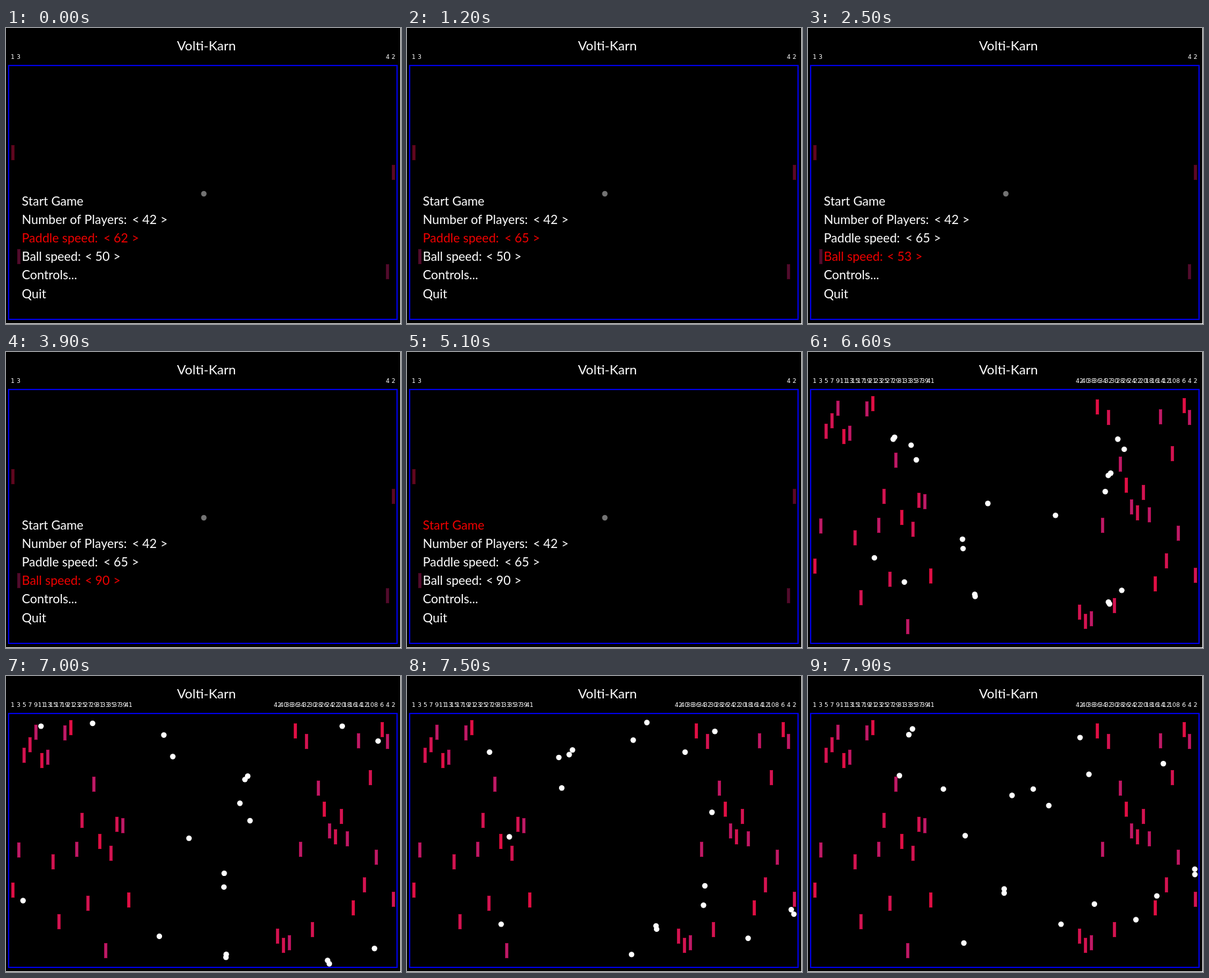
An HTML page with a canvas that plays this animation: 600x450 px, repeating every 8000 ms.

```html
<!DOCTYPE html>
<html lang="en">
<head>
<meta charset="utf-8">
<title>Volti-Karn</title>
<style>
  html, body { margin: 0; width: 100%; height: 100%; overflow: hidden; background: #000; }
  canvas { display: block; }
</style>
</head>
<body>
<canvas width="600" height="450"></canvas>
<script>
const ctx = document.querySelector('canvas').getContext('2d');
const LOOP = 8000, GAME_START = 5800, FRAME = 100;
const LAUNCH = 5750, STEP = 10, SPEED = 0.245, RADIUS = 4.2;
const FIELD = { left: 9, right: 589, top: 62, bottom: 438 };

// Paddles stand in columns from each side inwards; only their heights are free.
const makeSide = (heights, isLeft) => heights.map((y, i) => ({
  x: isLeft ? 10.2 + 8.8 * i : 588.6 - 8.8 * i,
  y,
  label: 2 * i + (isLeft ? 1 : 2),
  tint: Math.abs(Math.sin((i + (isLeft ? 0 : 3)) * Math.PI * 0.4)) ** 2
}));
const makePaddles = (left, right) => [...makeSide(left, true), ...makeSide(right, false)];

const menuPaddles = makePaddles([190, 348], [220, 371]);
const gamePaddles = makePaddles(
  [326, 265, 121, 105, 86, 129, 124, 283, 374, 87, 79, 264, 220, 346, 165, 252, 418, 270, 226, 228, 341],
  [340, 100, 82, 276, 155, 318, 99, 353, 248, 214, 245, 236, 203, 171, 386, 100, 264, 84, 406, 410, 396]
);

// Launch directions in degrees, clockwise from the right.
const launchAngles = [
  -35, -30, -19, -18, -11, -1, 32, 38, 39,
  145, 146, 152, 163, 167, 171, 186, 205, 212, 215, 216
];

function moveBall(ball) {
  ball.x += ball.vx * STEP;
  ball.y += ball.vy * STEP;
  if (ball.y < FIELD.top) ball.vy = Math.abs(ball.vy);
  if (ball.y > FIELD.bottom) ball.vy = -Math.abs(ball.vy);
  if (ball.x < FIELD.left) ball.vx = Math.abs(ball.vx);
  if (ball.x > FIELD.right) ball.vx = -Math.abs(ball.vx);
  const hit = gamePaddles.find(p =>
    Math.abs(ball.x - p.x) < 2.5 + RADIUS && Math.abs(ball.y - p.y) < 11 + RADIUS);
  if (hit) ball.vx = Math.sign(ball.x - hit.x) * Math.abs(ball.vx);
}

// Plays the round once and keeps the ball positions of every displayed moment.
function playRound() {
  const balls = launchAngles.map(degrees => {
    const angle = degrees * Math.PI / 180;
    return { x: 300, y: 252, vx: SPEED * Math.cos(angle), vy: SPEED * Math.sin(angle) };
  });
  const moments = {};
  for (let t = LAUNCH; t < LOOP; t += STEP) {
    if (t % FRAME === 0) moments[t] = balls.map(({ x, y }) => [x, y]);
    balls.forEach(moveBall);
  }
  return moments;
}
const round = playRound();

function text(str, x, y, size, color = '#fff', align = 'left', family = 'Lato') {
  ctx.font = `${size}px ${family}, sans-serif`;
  ctx.textAlign = align;
  ctx.fillStyle = color;
  ctx.fillText(str, x, y);
}

function dot(x, y, color) {
  ctx.fillStyle = color;
  ctx.beginPath();
  ctx.arc(x, y, RADIUS, 0, Math.PI * 2);
  ctx.fill();
}

function drawPaddle({ x, y, label, tint }, light) {
  const shade = (...rgb) => `rgb(${rgb.map(c => Math.round(c * light)).join(',')})`;
  const left = Math.round(x - 2.5), top = y - 12;
  ctx.fillStyle = shade(200 - 30 * tint, 8, 50 + 30 * tint);
  ctx.fillRect(left, top, 5, 23);
  ctx.fillStyle = shade(222 - 40 * tint, 16 + 16 * tint, 72 + 36 * tint);
  ctx.fillRect(left + 1, top + 1, 3, 21);
  text(label, x, 47, 9, '#fff', 'center', '"DejaVu Sans"');
}

function ballSpeed(t) {
  if (t < 2500) return 50;
  return Math.round(53 + 37 * Math.min(1, (t - 2500) / 1400));
}

function selectedRow(t) {
  return t < 1800 ? 2 : t < 4700 ? 3 : t < 4900 ? 2 : t < 5100 ? 1 : 0;
}

function drawMenu(t) {
  const paddleSpeed = t < 300 ? 62 : t < 1100 ? 63 : t < 1200 ? 64 : 65;
  // Label, then a value with the x where its opening bracket starts.
  const rows = [
    ['Start Game'],
    ['Number of Players:', 42, 191.5],
    ['Paddle speed:', paddleSpeed, 148],
    ['Ball speed:', ballSpeed(t), 120],
    ['Controls...'],
    ['Quit']
  ];
  rows.forEach(([label, value, x], i) => {
    const y = Math.round(270 + 28.1 * i);
    const color = i === selectedRow(t) ? '#f00000' : '#fff';
    text(label, 24, y, 19, color);
    if (value === undefined) return;
    text('<', x, y, 19, color);
    text(value, x + 15.5, y, 19, color);
    text('>', x + 54, y, 19, color, 'right');
  });
}

function draw(t) {
  ctx.fillStyle = '#fff';
  ctx.fillRect(0, 0, 600, 450);
  ctx.fillStyle = '#000';
  ctx.fillRect(0, 0, 599, 449);
  ctx.strokeStyle = '#0000dc';
  ctx.lineWidth = 2;
  ctx.strokeRect(4, 57, 590, 386);
  text('Volti-Karn', 304.5, 33.5, 20, '#fff', 'center');
  if (t < GAME_START) {
    dot(300.5, 252, '#737373');
    menuPaddles.forEach(paddle => drawPaddle(paddle, 0.43));
    drawMenu(t);
  } else {
    round[t].forEach(([x, y]) => dot(x, y, '#fff'));
    gamePaddles.forEach(paddle => drawPaddle(paddle, 1));
  }
}

const start = performance.now();
function tick() {
  const elapsed = (performance.now() - start) % LOOP;
  draw(Math.floor(elapsed / FRAME) * FRAME);
  requestAnimationFrame(tick);
}
tick();
</script>
</body>
</html>
```
